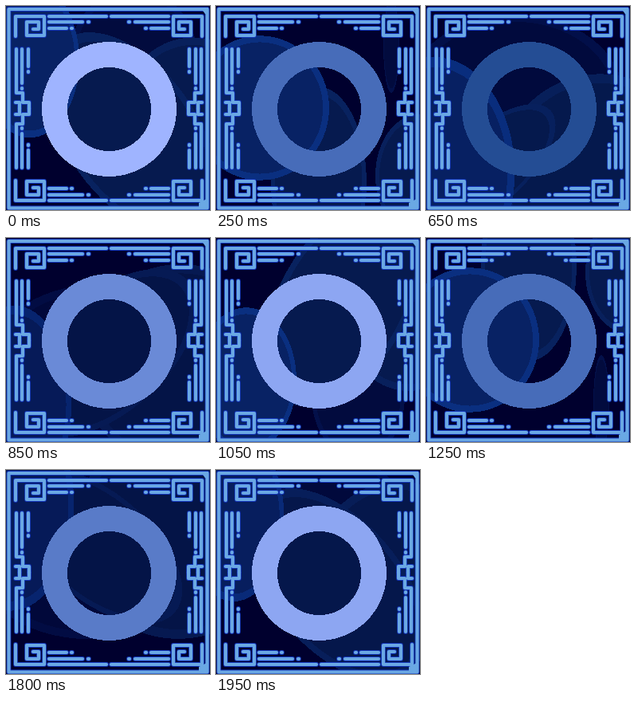
An HTML page that plays this animation: 256 px wide and 256 px high, repeating every 2 s.

```html
<!DOCTYPE html>
<html lang="en">
<head>
<meta charset="utf-8">
<title>Ornate ring</title>
<style>
  html, body { margin: 0; width: 100%; height: 100%; overflow: hidden; background: #00002e; }
  svg { display: block; width: 100vw; height: 100vh; }
  .line { fill: none; stroke-linecap: round; stroke-linejoin: round; }
  #waves, #ring { shape-rendering: crispEdges; }
</style>
</head>
<body>
<svg viewBox="0 0 256 256">
  <defs>
    <path id="corner" d="M12 38V13H48V37H26V20H41V29H34
      M54 13H126 M54 20H96 M103 20H104 M54 28H76 M82 28H83
      M20 54V97 M20 103V104 M28 54V76 M28 82V83
      M13 54V109H21V121H29V129 M12 121H17V129"/>
    <g id="frame">
      <rect x="3.5" y="4" width="249" height="249.5"/>
      <use href="#corner"/>
      <use href="#corner" transform="matrix(-1 0 0 1 258 0)"/>
      <use href="#corner" transform="matrix(1 0 0 -1 0 257)"/>
      <use href="#corner" transform="matrix(-1 0 0 -1 258 257)"/>
    </g>
  </defs>
  <rect width="256" height="256" fill="#00002e"/>
  <g id="waves"></g>
  <circle id="ring" cx="129.5" cy="129.5" r="68.5" fill="none" stroke-width="32"/>
  <g class="line">
    <use href="#frame" stroke="#1030b4" stroke-width="5.8"/>
    <use href="#frame" stroke="#6aa8e4" stroke-width="4.2"/>
  </g>
  <path d="M244 2H254V10H250Z M254 241V254H242V247Z" fill="#6aa8e4"/>
</svg>
<script>
const HALF = 1000, STEP = 50, MIDDLE = 128;

// Waves of one and of two turns per loop, each highest at the given time.
const slow = (t, peak) => Math.cos(Math.PI * (t - peak) / HALF);
const fast = (t, peak) => Math.cos(2 * Math.PI * (t - peak) / HALF);

// Heights and tilts swing slowly, so the second half mirrors the first.
const shapes = [
  { name: "haze", fill: "#020b3e", rim: "#03104a", pose: t => ({
    x: 160 + 60 * fast(t, 250), y: MIDDLE - 80 * slow(t, 200),
    rx: 80 + 70 * fast(t, 750), ry: 85 + 25 * fast(t, 750), tilt: 0 }) },
  { name: "right", fill: "#061a4f", rim: "#08205c", pose: t => ({
    x: 235 + 20 * fast(t, 250), y: MIDDLE + 105 * slow(t, 450),
    rx: 95 + 40 * fast(t, 750), ry: 105 + 28 * fast(t, 750), tilt: 0 }) },
  { name: "blade", fill: "#061a4f", rim: "#08225f", pose: t => ({
    x: 115 + 45 * fast(t, 50), y: MIDDLE + 105 * slow(t, 400),
    rx: 60 + 22 * fast(t, 0), ry: 120 + 25 * fast(t, 0), tilt: 50 * slow(t, 750) }) },
  { name: "left", fill: "#082264", rim: "#0a2f80", pose: t => ({
    x: 30 + 25 * fast(t, 250), y: MIDDLE + 85 * slow(t, 750),
    rx: 87 + 25 * fast(t, 500), ry: 115 + 30 * fast(t, 650), tilt: 0 }) }
];

const waves = document.getElementById("waves");
const ring = document.getElementById("ring");
const mix = (a, b, k) => a + (b - a) * k;

function addEllipse(fill) {
  const node = document.createElementNS("http://www.w3.org/2000/svg", "ellipse");
  node.setAttribute("fill", fill);
  waves.append(node);
  return node;
}

function place(node, { x, y, rx, ry, tilt }, scale) {
  node.setAttribute("rx", rx * scale);
  node.setAttribute("ry", ry * scale);
  node.setAttribute("transform", `translate(${x} ${y}) rotate(${tilt})`);
}

for (const shape of shapes) {
  shape.outer = addEllipse(shape.rim);
  shape.inner = addEllipse(shape.fill);
}

function draw(now) {
  const time = Math.floor(now % (2 * HALF) / STEP) * STEP;
  for (const { outer, inner, pose } of shapes) {
    const now = pose(time);
    place(outer, now, 1);
    place(inner, now, 0.91);
  }

  const t = time % HALF;
  const dim = Math.max(0, 1 - Math.abs(t - 825) / 200);
  waves.setAttribute("opacity", 1 - 0.25 * dim);

  const glow = Math.max(0, 1 - Math.min(t, HALF - t) / 400);
  const color = [mix(18, 159, glow), mix(58, 180, glow ** 0.9), mix(120, 255, glow ** 0.75)];
  ring.setAttribute("stroke", `rgb(${color.map(Math.round)})`);
}

const start = performance.now();
function tick() {
  draw(performance.now() - start);
  requestAnimationFrame(tick);
}
tick();
</script>
</body>
</html>
```
